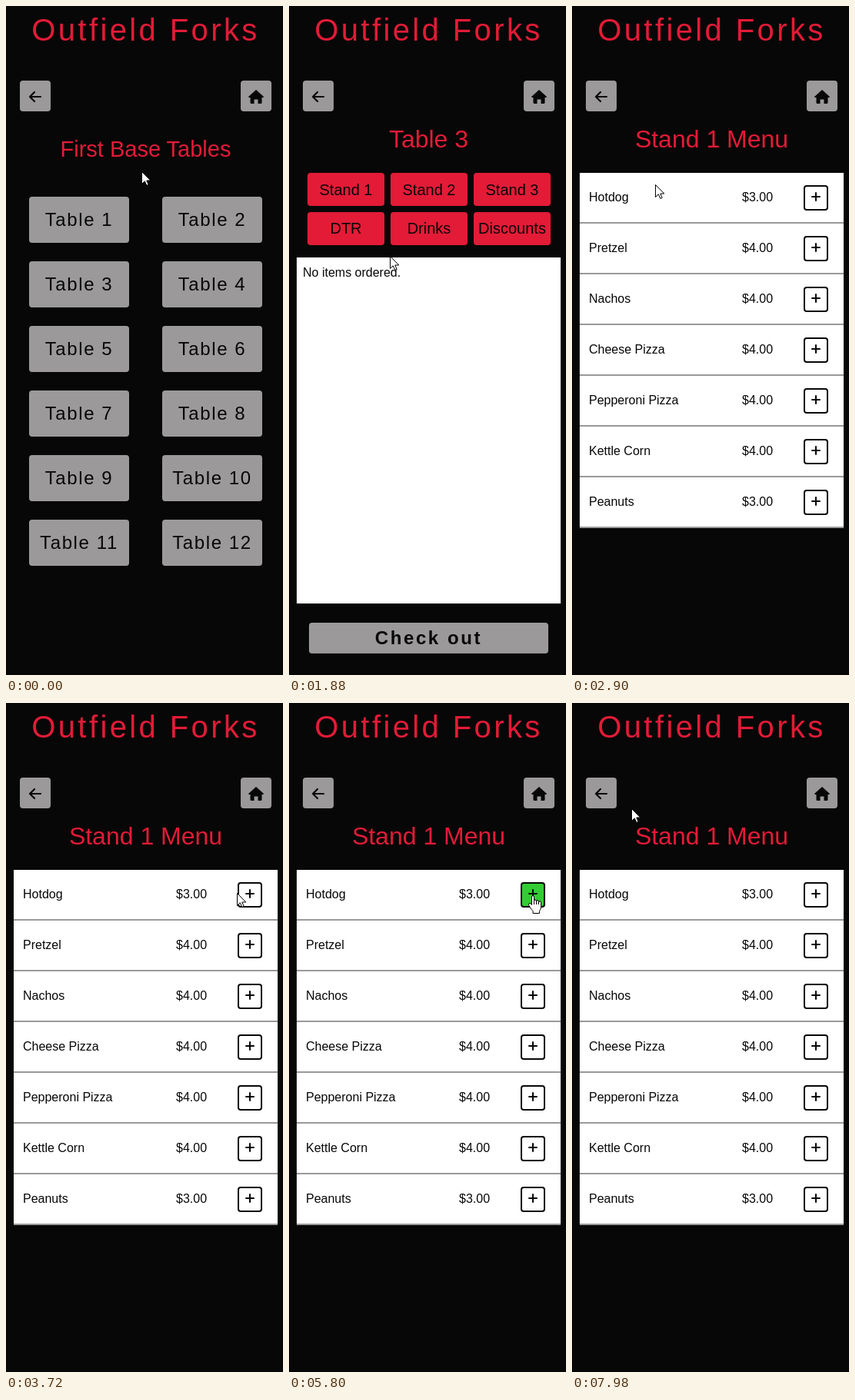
An HTML page for the animation above (8000 ms loop, 360x870 px).

```html
<!DOCTYPE html>
<html lang="en">
<head>
<meta charset="utf-8">
<title>Table ordering</title>
<style>
html, body { margin: 0; width: 100%; height: 100%; overflow: hidden; background: #070707; }
svg { display: block; font-family: "Liberation Sans", Arial, sans-serif; }
</style>
</head>
<body>
<svg id="stage" width="360" height="870" viewBox="0 0 360 870"></svg>
<script>
const BG = '#070707', RED = '#e31b37', GREY = '#9b9999', GREEN = '#32cd32';
const LOOP = 8000, MID = 181.5;

const rect = (x, y, w, h, fill, more = '') =>
  `<rect x="${x}" y="${y}" width="${w}" height="${h}" fill="${fill}" ${more}/>`;
const text = (s, x, y, size, fill, more = '') =>
  `<text x="${x}" y="${y}" font-size="${size}" fill="${fill}" ${more}>${s}</text>`;
const centred = (s, x, y, size, fill, more = '') =>
  text(s, x, y, size, fill, 'text-anchor="middle" ' + more);
const group = (id, body) => `<g id="${id}">${body}</g>`;

// Buttons that react to the pointer, listed per page
const buttons = { tables: [], order: [], menu: [] };
function button(page, x, y, w, h, fill, hover, body, edge = 'rx="4"') {
  const id = page + buttons[page].length;
  buttons[page].push({ id, x, y, w, h, fill, hover });
  return group(id, rect(x, y, w, h, fill, edge) + body);
}

const header =
  centred('Outfield Forks', MID, 45, 40, RED, 'letter-spacing="3.4"') +
  rect(18, 97, 40, 40, GREY, 'rx="4"') + rect(305, 97, 40, 40, GREY, 'rx="4"') +
  `<path d="M45 118H31M37 112L31 118L37 124" fill="none" stroke="${BG}" stroke-width="2.2"
    stroke-linecap="round" stroke-linejoin="round"/>
  <path d="M325 109L335 118Q335 119 334 119H332.5V125.5Q332.5 127 331 127H327.5V121.5H322.5V127H319
    Q317.5 127 317.5 125.5V119H316Q315 119 315 118Z" fill="${BG}"/>`;

let tables = centred('First Base Tables', MID, 196, 29, RED);
for (let i = 0; i < 12; i++) {
  const x = i % 2 ? 203 : 30, y = 248 + 84 * (i >> 1);
  tables += button('tables', x, y, 130, 60, GREY, RED,
    centred('Table ' + (i + 1), x + 65, y + 38, 24, BG, 'letter-spacing="1.6"'));
}

let order = centred('Table 3', MID, 184, 32, RED);
['Stand 1', 'Stand 2', 'Stand 3', 'DTR', 'Drinks', 'Discounts'].forEach((name, i) => {
  const x = 24 + 108 * (i % 3), y = i < 3 ? 217 : 268;
  order += button('order', x, y, 100, 43, RED, GREY,
    centred(name, x + 50, y + (i < 3 ? 29 : 28), 20, BG));
});
order += rect(10, 327, 343, 450, '#fff') + text('No items ordered.', 18, 352, 16, BG) +
  rect(26, 802, 311, 40, GREY, 'rx="4"') +
  centred('Check out', MID, 830, 24, BG, 'font-weight="bold" letter-spacing="2.6"');

let rows = '';
[['Hotdog', 3], ['Pretzel', 4], ['Nachos', 4], ['Cheese Pizza', 4], ['Pepperoni Pizza', 4],
 ['Kettle Corn', 4], ['Peanuts', 3]].forEach(([name, price], i) => {
  const y = 217 + 66 * i;
  rows += rect(10, y, 343, 64, '#fff') + rect(10, y + 64, 343, 2, GREY) +
    text(name, 22, y + 37, 16, BG) + text(`$${price}.00`, 221, y + 37, 16, BG) +
    button('menu', 302, y + 17, 30, 31, '#fff', GREEN,
      `<path d="M312 ${y + 31}h10m-5-5v10" stroke="${BG}" stroke-width="2" stroke-linecap="round"/>`,
      `rx="3" stroke="${BG}" stroke-width="2"`);
});
const menu = centred('Stand 1 Menu', MID, 184, 32, RED) + group('rows', rows);

const pointer = `<circle id="glow" r="12" fill="#ff0" opacity=".52"/>
  <g fill="#fff" stroke="#000" stroke-linejoin="round">
  <path id="arrow" d="M.5 .5V16.5L4.3 12.8 6.8 18.4 9.2 17.4 6.8 12H11.8Z"/>
  <path id="hand" d="M-1.5 12.5V2Q-1.5 .5 0 .5T1.5 2V7.5Q1.5 6 3 6T4.5 7.5V8Q4.5 6.5 6 6.5T7.5 8V9
    Q7.5 7.8 9 7.8T10.5 9.3V16Q10.5 18 8.5 20.5V23.5H0V20.5Q-2 18.5 -3.5 16T-5.5 12.5
    Q-5.8 10.5 -4 10.5T-1.5 12.5ZM1.5 7.5V12M4.5 8V12M7.5 9V12"/></g>`;

const $ = id => document.getElementById(id);
$('stage').innerHTML = rect(0, 0, 360, 870, BG) + header +
  group('tables', tables) + group('order', order) + group('menu', menu) + group('pointer', pointer);

// Pointer moves: start, end, target, optional bend
const moves = [
  [300, 860, [139, 358], [184, 300]],
  [1720, 2200, [108, 232]],
  [3260, 3820, [317, 248]],
  [5740, 6280, [317, 311]],
  [7420, 7980, [77, 137]]
];
const clicks = [[1200, 1280], [2580, 2680], [4220, 4320], [5140, 5340], [6900, 7160]];
const clamp = v => Math.min(1, Math.max(0, v));

function pointerAt(t) {
  let p = [176, 215];
  for (const [from, to, end, bend] of moves) {
    if (t < from) break;
    const u = clamp((t - from) / (to - from)), k = u * u * (3 - 2 * u);
    p = p.map((a, i) => {
      const c = bend ? bend[i] : (a + end[i]) / 2;
      return (1 - k) * (1 - k) * a + 2 * k * (1 - k) * c + k * k * end[i];
    });
  }
  return p;
}

const show = (id, on) => $(id).style.display = on ? '' : 'none';

function draw(now) {
  const t = now % LOOP, [x, y] = pointerAt(t);
  const page = t < 1300 ? 'tables' : t < 2700 ? 'order' : 'menu';
  for (const name in buttons) show(name, name === page);
  show('rows', t >= 2900);

  // Buttons sink a little while pressed
  const press = Math.max(...clicks.map(([a, b]) =>
    Math.min(clamp((t - a) / 100), clamp((b + 100 - t) / 100))));
  let over = false;
  for (const b of buttons[page]) {
    const hit = x >= b.x && x <= b.x + b.w && y >= b.y && y <= b.y + b.h;
    over = over || hit;
    const g = $(b.id), d = hit && page === 'menu' ? 2.5 * press : 0;
    g.firstChild.setAttribute('fill', hit ? b.hover : b.fill);
    g.setAttribute('transform', `translate(${d} ${d})`);
  }

  const hand = over && !(t >= 2660 && t < 2700);
  show('hand', hand);
  show('arrow', !hand);
  show('glow', clicks.some(([a, b]) => t >= a && t < b));
  $('pointer').setAttribute('transform', `translate(${Math.round(x)} ${Math.round(y)})`);
  requestAnimationFrame(draw);
}
draw(0);
</script>
</body>
</html>
```
